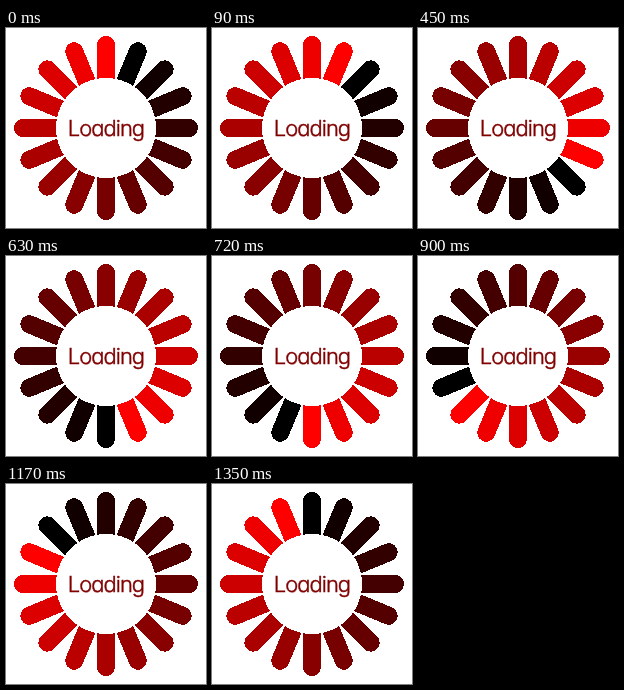
An HTML page for the animation above (1440 ms loop, 200 px wide and 200 px high).

```html
<!DOCTYPE html>
<html>
<head>
<meta charset="utf-8">
<style>
  html, body { margin: 0; height: 100%; overflow: hidden; background: #fff; }
  svg { display: block; width: 100vw; height: 100vh; }
  text { font: 300 22px Inter, Lato, sans-serif; font-feature-settings: "cv11"; letter-spacing: -1px; }
</style>
</head>
<body>
<svg viewBox="0 0 200 200">
  <g id="spokes" stroke-width="18" stroke-linecap="round" shape-rendering="crispEdges"></g>
  <circle cx="100" cy="100" r="50" fill="#fff" shape-rendering="crispEdges"/>
  <text x="100" y="108" text-anchor="middle" fill="#800000" stroke="#800000" stroke-width=".4">Loading</text>
</svg>
<script>
  const COUNT = 16, STEP = 90;
  const group = document.getElementById('spokes');
  const spokes = Array.from({ length: COUNT }, (_, i) => {
    const line = document.createElementNS('http://www.w3.org/2000/svg', 'path');
    line.setAttribute('d', 'M100 54V17');
    line.setAttribute('transform', `rotate(${i * 360 / COUNT} 100 100)`);
    return group.appendChild(line);
  });

  function draw() {
    const head = Math.floor(performance.now() / STEP) % COUNT;
    spokes.forEach((spoke, i) => {
      const age = (head - i + COUNT) % COUNT;
      const red = Math.round(255 * (1 - age / (COUNT - 1)));
      spoke.setAttribute('stroke', `rgb(${red},0,0)`);
    });
    requestAnimationFrame(draw);
  }
  draw();
</script>
</body>
</html>
```
